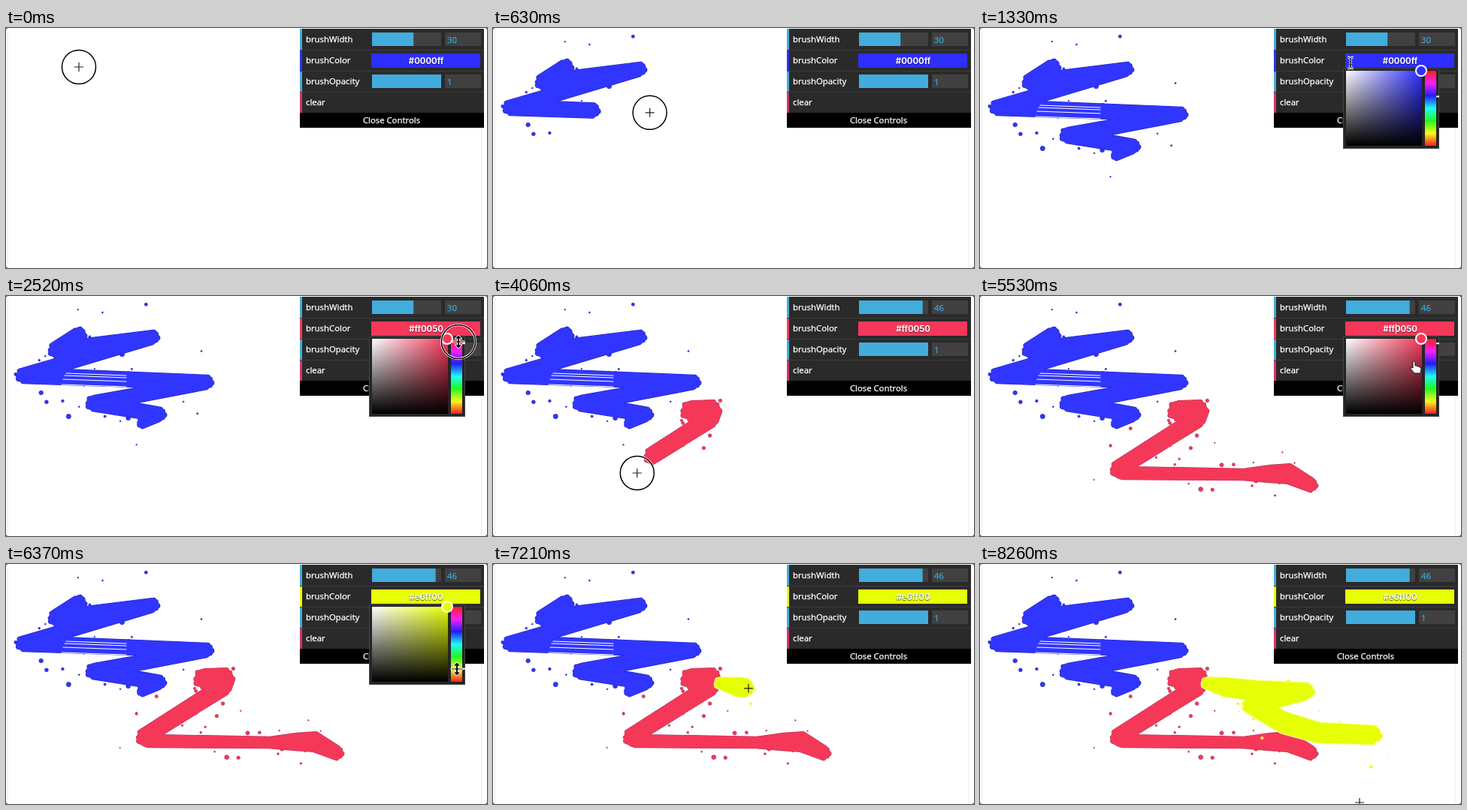
Write an HTML page that moves like this. It is 640x320 px and loops after 8.33 s.

```html
<!DOCTYPE html>
<html lang="en">
<head>
<meta charset="utf-8">
<title>Brush demo</title>
<style>
html, body { margin: 0; width: 100%; height: 100%; overflow: hidden; background: #fff; }
svg { display: block; width: 100vw; height: 100vh; }
text { font: 500 11.3px "Noto Sans", "Open Sans", sans-serif; fill: #fff; stroke: #fff; stroke-width: .25px; }
.num { fill: #3ba3d6; stroke: #3ba3d6; }
#hex { font: 700 11.3px Inter, "Liberation Sans", sans-serif; stroke: none; text-shadow: 0 1px 1px rgba(0, 0, 0, .65); }
#paint path { fill: none; stroke-linecap: round; stroke-linejoin: round; }
</style>
</head>
<body>
<svg viewBox="0 0 640 320">
  <defs>
    <linearGradient id="sat"><stop stop-color="#fff"/><stop id="satEnd" offset="1"/></linearGradient>
    <linearGradient id="dark" x2="0" y2="1"><stop stop-opacity="0"/><stop offset="1"/></linearGradient>
    <linearGradient id="rainbow" x2="0" y2="1"></linearGradient>
  </defs>
  <path d="M2.5 0V320M632.5 133V320" stroke="#eee"/>
  <path d="M0 0h2L0 2zM640 0h-2l2 2zM0 320h2l-2-2zM640 320h-2l2-2z" fill="#555"/>
  <g id="paint"></g>

  <g id="panel">
    <rect x="391" y="1" width="245" height="112" fill="#2a2a2a"/>
    <path d="M391 29.5H636M391 57.5H636M391 85.5H636" stroke="#3c3c3c"/>
    <rect x="391" y="113" width="245" height="20"/>
    <path d="M391 1h3v28h-3zM391 58h3v27h-3z" fill="#42add8"/>
    <path d="M391 86h3v27h-3z" fill="#d2346a"/>
    <rect id="stripe" x="391" y="30" width="3" height="27"/>
    <path d="M487 6h92v18h-92zM584 6h48v18h-48zM584 62h48v18h-48z" fill="#414141"/>
    <rect id="slider" x="487" y="6" height="18" fill="#42acdc"/>
    <rect x="487" y="62" width="92" height="18" fill="#42acdc"/>
    <rect id="swatch" x="486" y="34" width="145" height="19"/>
    <text x="399" y="19">brushWidth</text>
    <text x="399" y="47">brushColor</text>
    <text x="399" y="75">brushOpacity</text>
    <text x="399" y="103">clear</text>
    <text x="513" y="127" text-anchor="middle">Close Controls</text>
    <text id="width" class="num" x="587" y="20"></text>
    <text class="num" x="587" y="76">1</text>
    <text id="hex" x="559" y="48" text-anchor="middle"></text>
    <path id="caret" d="M553.5 37V50" stroke="#fff"/>
  </g>

  <g id="picker">
    <rect x="483.500" y="54.500" width="127" height="106" fill="#252525" stroke="#444"/>
    <rect x="487" y="57" width="101" height="100" fill="url(#sat)"/>
    <rect x="487" y="57" width="101" height="100" fill="url(#dark)"/>
    <rect x="592" y="57" width="15" height="100" fill="url(#rainbow)"/>
    <rect id="marker" x="607" width="4" height="2" fill="#fff"/>
    <circle id="knob" cx="587" cy="57" r="7" stroke="#fff" stroke-width="2"/>
  </g>

  <g id="cursor" fill="none">
    <g id="ring">
      <circle r="22.500" stroke="#fff" stroke-width="3"/>
      <circle r="22.500" stroke="#000" stroke-width="1.500"/>
    </g>
    <path id="plus" d="M-6 0H6M0 -6V6" stroke="#222" stroke-width="1.200"/>
    <g id="beam">
      <path id="ibar" d="M-4 -7Q0 -7 0 -4V5Q0 8 -4 8M4 -7Q0 -7 0 -4V5Q0 8 4 8M-2 3H2" stroke="#fff" stroke-width="3"/>
      <path d="M-4 -7Q0 -7 0 -4V5Q0 8 -4 8M4 -7Q0 -7 0 -4V5Q0 8 4 8M-2 3H2" stroke="#111"/>
    </g>
    <path id="size" d="M0 -9L5 -4H1.500V-1H8V1H1.500V4H5L0 9L-5 4H-1.500V1H-8V-1H-1.500V-4H-5Z" fill="#111" stroke="#fff"/>
    <path id="hand" d="M-3 -7Q-1.500 -9 0 -7V-2Q2 -3 3 -1Q5 -2 6 0Q8 0 8 2L7 8H-1L-6 2Q-6 -1 -3 1Z" fill="#fff" stroke="#111"/>
  </g>
</svg>
<script>
const LOOP = 8330, STEP = 70, BRISTLE = 6;
const $ = id => document.getElementById(id);
const show = (id, on) => { $(id).style.display = on ? '' : 'none'; };
const within = (t, a, b) => t >= a && t < b;

let seed = 11;
const random = () => (seed = seed * 16807 % 2147483647) / 2147483647;

function add(parent, tag, attrs) {
  const el = document.createElementNS('http://www.w3.org/2000/svg', tag);
  for (const k in attrs) el.setAttribute(k, attrs[k]);
  return parent.appendChild(el);
}

// Keys are [time, ...values], joined by straight lines.
function track(keys, t) {
  const i = keys.findIndex(k => k[0] > t);
  if (i < 0) return keys[keys.length - 1].slice(1);
  if (!i) return keys[0].slice(1);
  const a = keys[i - 1], b = keys[i], f = (t - a[0]) / (b[0] - a[0]);
  return a.slice(1).map((v, n) => v + (b[n + 1] - v) * f);
}

// Spreads points [x, y, radius] over a time span at constant speed.
function pace(from, to, points) {
  let sum = 0;
  const run = points.map((p, i) => i ? sum += Math.hypot(p[0] - points[i - 1][0], p[1] - points[i - 1][1]) : 0);
  return points.map((p, i) => [from + (to - from) * run[i] / sum, ...p]);
}

const blue = {
  fill: '#3036ff', edge: '#2424b4', rim: 1.2, lag: 70, drops: 46,
  keys: pace(140, 930, [[97, 52, 11], [66, 72, 11], [195, 55, 10], [23, 106, 11],
    [267, 115, 10], [116, 143, 11], [204, 158, 10], [182, 169, 8]])
};
const red = {
  fill: '#f53858', edge: '#b03562', rim: 1.2, lag: 100, drops: 38,
  keys: pace(3650, 4650, [[262, 153, 14], [291, 152, 14], [287, 166, 13], [184, 231, 12],
    [190, 236, 9], [350, 238, 8], [385, 237, 12], [410, 237, 14], [440, 252, 10]])
};
const yellow = {
  fill: '#e6ff06', edge: '#f5ffa0', rim: 2.5, lag: 10, drops: 18,
  keys: pace(7120, 8000, [[302, 159, 8], [325, 164, 13], [365, 169, 14], [434, 170, 12],
    [362, 186, 15], [402, 211, 15], [450, 225, 14], [523, 228, 13]])
};
const strokes = [blue, red, yellow];

const pointer = [
  ...blue.keys, [1260, 493, 46], [1330, 493, 46], [1600, 600, 91], [1720, 600, 91],
  [2450, 602, 61], [2520, 602, 61], [2700, 542, 15], [2800, 542, 15], [3080, 572, 15],
  ...red.keys, [5000, 552, 46], [5250, 552, 46], [5530, 579, 95], [5740, 600, 100],
  [6300, 600, 140], [6480, 600, 140], ...yellow.keys, [8260, 505, 318]
];
const hues = [[1720, 240], [2450, 341.18], [5739, 341.18], [5740, 210], [6300, 66]];
const widths = [[2800, 30], [3080, 46]];
// Each pointer shape lasts until the given time.
const shapes = [[1200, 'ring'], [1450, 'beam'], [1540, 'hand'], [2660, 'size'], [3160, 'slide'],
  [4930, 'ring'], [5320, 'beam'], [5700, 'hand'], [6500, 'size'], [LOOP, 'plus']];

const bristles = Array.from({ length: 24 }, (_, i) => {
  const a = i * 2.4, d = Math.sqrt((i + .5) / 24) * (.95 + random() * .15);
  return [Math.cos(a) * d, Math.sin(a) * d];
});

// Paint thrown off beside the path, appearing as the brush passes.
function splatter(s) {
  const from = s.keys[0][0], to = s.keys[s.keys.length - 1][0];
  return Array.from({ length: s.drops }, () => {
    const t = from + random() * (to - from), [x, y, r] = track(s.keys, t);
    const a = random() * Math.PI * 2, d = r + 4 + random() ** 1.5 * 38;
    const el = add($('paint'), 'circle', {
      cx: x + Math.cos(a) * d, cy: y + Math.sin(a) * d, r: .8 + random() ** 2 * 2.3,
      fill: s.fill, stroke: s.edge, 'stroke-width': .7
    });
    return { t, el };
  });
}

for (const s of strokes) {
  s.spray = splatter(s);
  s.rimPath = add($('paint'), 'path', { stroke: s.edge, 'stroke-width': BRISTLE + s.rim });
  s.body = add($('paint'), 'path', { stroke: s.fill, 'stroke-width': BRISTLE });
  // Dry gaps where the brush crosses fastest.
  if (s === blue) s.gaps = add($('paint'), 'path', { stroke: '#fff', 'stroke-width': 1.1,
    d: [103, 106, 111, 118].map((y, i) => `M${80 - i * 2} ${y}L160 ${y + 3}`).join('') });
}
for (let i = 0; i <= 6; i++)
  add($('rainbow'), 'stop', { offset: i / 6, 'stop-color': `hsl(${360 - i * 60} 95% 55%)` });

function hexOf(hue) {
  return '#' + [5, 3, 1].map(n => {
    const k = (n + hue / 60) % 6, v = 1 - Math.max(0, Math.min(k, 4 - k, 1));
    return Math.round(v * 255).toString(16).padStart(2, '0');
  }).join('');
}

function drawStroke(s, t) {
  const end = t - s.lag;
  const trail = [...s.keys.filter(k => k[0] < end).map(k => k.slice(1)), track(s.keys, end)];
  const d = end < s.keys[0][0] ? '' : bristles.map(([u, v]) => 'M' + trail.map(([x, y, r]) => {
    const reach = r - BRISTLE / 2;
    return `${x + u * reach} ${y + v * reach}`;
  }).join('L')).join('');
  s.rimPath.setAttribute('d', d);
  s.body.setAttribute('d', d);
  for (const drop of s.spray) drop.el.style.display = end >= drop.t ? '' : 'none';
  if (s.gaps) s.gaps.style.display = end >= s.keys[4][0] ? '' : 'none';
}

function drawPanel(t) {
  const [hue] = track(hues, t), [size] = track(widths, t);
  const color = `hsl(${hue > 300 ? hue + 8 : hue} ${hue > 300 ? 90 : 100}% ${hue < 120 ? 51 : 59}%)`;
  for (const id of ['stripe', 'swatch', 'knob']) $(id).style.fill = color;
  $('satEnd').style.stopColor = color;
  $('hex').textContent = hexOf(hue);
  $('width').textContent = Math.round(size);
  $('slider').setAttribute('width', size / 50 * 92);
  $('marker').setAttribute('y', 57 + (360 - hue) / 3.6);
  show('picker', within(t, 1200, 2660) || within(t, 4950, 6560));
  show('caret', within(t, 5180, 5740));
}

function drawCursor(t) {
  const [x, y] = track(pointer, t);
  const shape = shapes.find(s => t < s[0])[1];
  $('cursor').setAttribute('transform', `translate(${x} ${y})`);
  $('size').setAttribute('transform', shape === 'slide' ? 'rotate(90)' : '');
  show('beam', shape === 'beam');
  show('hand', shape === 'hand');
  show('size', shape === 'size' || shape === 'slide');
  show('plus', shape === 'ring' || shape === 'plus');
  show('ring', shape === 'ring' || within(t, 2450, 2660));
}

function frame(now) {
  const t = Math.floor(now % LOOP / STEP) * STEP;
  for (const s of strokes) drawStroke(s, t);
  drawPanel(t);
  drawCursor(t);
  requestAnimationFrame(frame);
}
frame(0);
</script>
</body>
</html>
```
